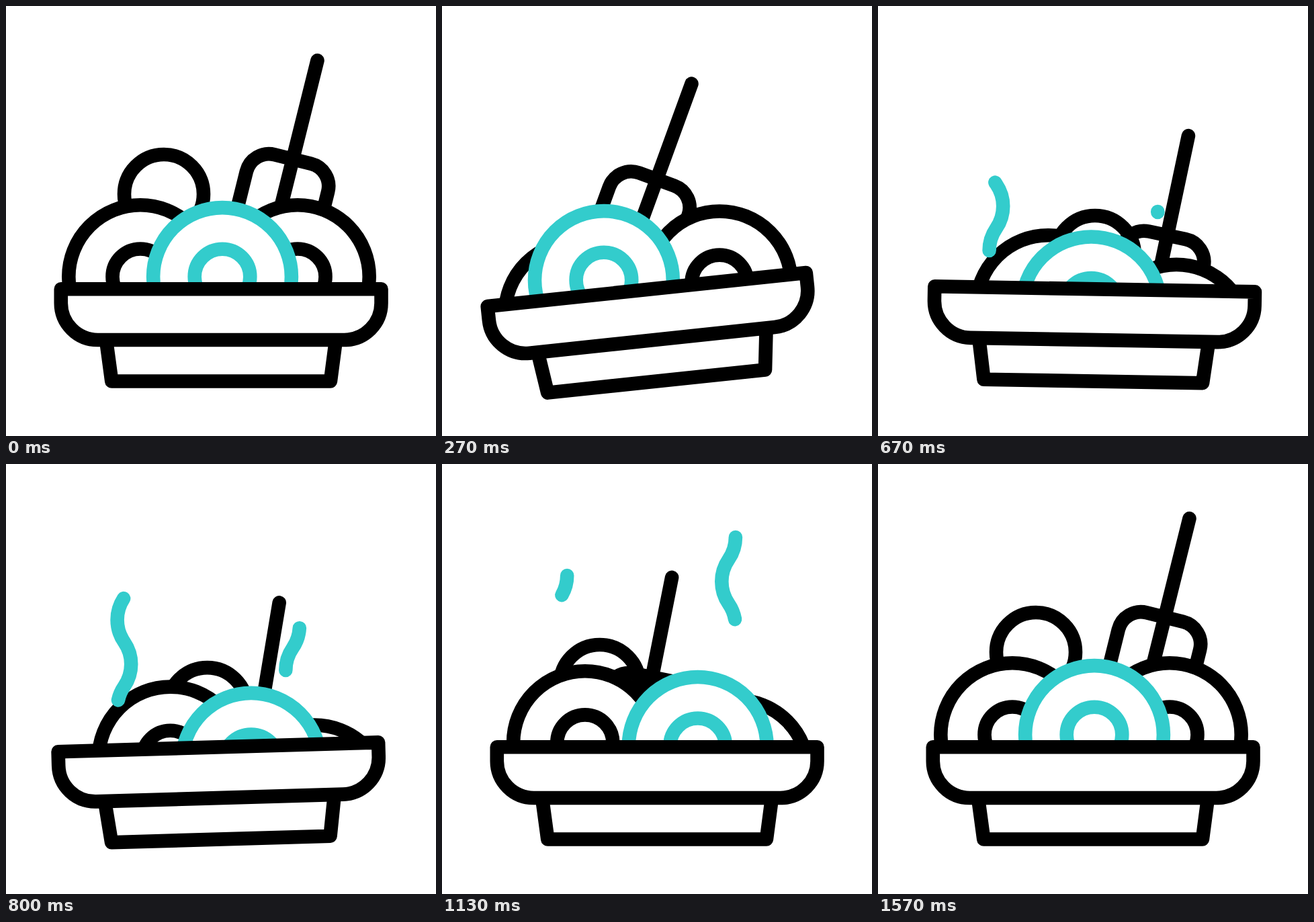
These frames come from a looping animation (640 px wide and 640 px high, 1.67 s). An HTML page:

```html
<!DOCTYPE html>
<html lang="en">
<head>
<meta charset="utf-8">
<title>Noodle bowl</title>
<style>
  html, body { margin: 0; height: 100%; overflow: hidden; background: #fff; }
  svg { display: block; width: 100%; height: 100%; fill: #fff; stroke: #000; stroke-width: 20.6; stroke-linecap: round; stroke-linejoin: round; }
  .teal { stroke: #3cc; }
  .line { fill: none; }
</style>
</head>
<body>
<svg viewBox="0 0 640 640">
  <circle id="meatball" r="59"/>
  <g id="fork" class="line">
    <path d="M0 0V245M-62.5 235V186A34.5 34.5 0 0 1 -28 151.5H28A34.5 34.5 0 0 1 62.5 186V235"/>
  </g>
  <g id="left"><circle r="106.7"/><circle r="41.5"/></g>
  <g id="right"><circle r="106.7"/><circle r="41.5"/></g>
  <g id="front" class="teal"><circle r="102.9"/><circle r="41.3"/></g>
  <g id="bowl">
    <rect x="-100" y="421" width="840" height="400" stroke="none"/>
    <path d="M149 497L157.3 558.5H482.9L491 497"/>
    <path d="M81.8 421.3H558.5V442A54.8 54.8 0 0 1 503.7 497H136.6A54.8 54.8 0 0 1 81.8 442Z"/>
  </g>
  <path class="teal line steam" pathLength="1"/>
  <path class="teal line steam" pathLength="1"/>
</svg>
<script>
const LOOP = 1670;
const byId = id => document.getElementById(id);
const clamp01 = v => Math.min(1, Math.max(0, v));

// Smooth curve through [time, value] keys, at rest at both ends.
function curve(keys) {
  const slope = i => (keys[i + 1][1] - keys[i][1]) / (keys[i + 1][0] - keys[i][0]);
  const tangents = keys.map((key, i) => {
    if (!i || i === keys.length - 1) return 0;
    const before = key[0] - keys[i - 1][0], after = keys[i + 1][0] - key[0];
    return (slope(i - 1) * after + slope(i) * before) / (before + after);
  });
  return time => {
    let i = 0;
    while (i < keys.length - 2 && time > keys[i + 1][0]) i++;
    const [t0, v0] = keys[i], [t1, v1] = keys[i + 1];
    const h = t1 - t0, u = clamp01((time - t0) / h), w = 1 - u;
    return v0 * w * w * (1 + 2 * u) + v1 * u * u * (3 - 2 * u)
      + h * u * w * (tangents[i] * w - tangents[i + 1] * u);
  };
}

const TIMES = [0, 270, 470, 670, 930, 1330, 1570];
const track = (...values) => curve(values.map((v, i) => [TIMES[i], v]));

const movers = [
  { id: "meatball", x: track(235, 265, 300, 323, 267, 220, 235), y: track(280, 385, 385, 371, 352, 303, 280) },
  { id: "left", x: track(200, 200.5, 228, 253, 229, 202, 200), y: track(403, 458, 462, 448, 429, 405, 403) },
  { id: "right", x: track(434, 413, 434, 444, 469, 409, 434), y: track(403, 412, 455, 491.5, 488, 424, 403) },
  { id: "front", x: track(322, 241, 254, 317, 400, 338.5, 322), y: track(403, 408, 428.5, 446.3, 435.7, 406, 403) },
  { id: "fork", x: track(463.5, 371.5, 409.5, 462, 341, 390, 463.5), y: track(81, 115.5, 158.5, 193, 208, 117.5, 81),
    turn: track(14, 20, 25, 12, 9.5, 13.6, 14) }
];

const tilt = curve([[0, 0], [270, -6], [360, -8.3], [470, -0.9], [575, 4], [670, 1], [760, -2.1], [870, 0], [930, 0], [1570, 0]]);

// Each wisp grows along its wave from the bottom, then its tail follows.
const WISP_TIME = 415;
const quarter = (sweep, dx) => `a58 58 0 0 ${sweep} ${dx} -33`;
const toRight = quarter(1, 10.3) + quarter(0, 10.3);
const toLeft = quarter(0, -10.3) + quarter(1, -10.3);
const wisps = [
  { start: "M165.6 364", head: 458, tail: 776 },
  { start: "M416.3 307", head: 669, tail: 973 }
];
const wispPaths = [...document.querySelectorAll(".steam")];
wispPaths.forEach((path, i) => path.setAttribute("d", wisps[i].start + toRight + toLeft + toRight));

function draw(time) {
  for (const { id, x, y, turn } of movers) {
    const angle = turn ? turn(time) : 0;
    byId(id).setAttribute("transform", `translate(${x(time)} ${y(time)}) rotate(${angle})`);
  }
  byId("bowl").setAttribute("transform", `rotate(${tilt(time)} 320 568)`);
  wispPaths.forEach((path, i) => {
    const head = clamp01((time - wisps[i].head) / WISP_TIME);
    const tail = clamp01((time - wisps[i].tail) / WISP_TIME);
    path.style.display = head > 0 && tail < 1 ? "" : "none";
    path.setAttribute("stroke-dasharray", `${head - tail} 2`);
    path.setAttribute("stroke-dashoffset", -tail);
  });
}

const started = performance.now();
function tick() {
  draw((performance.now() - started) % LOOP);
  requestAnimationFrame(tick);
}
tick();
</script>
</body>
</html>
```
